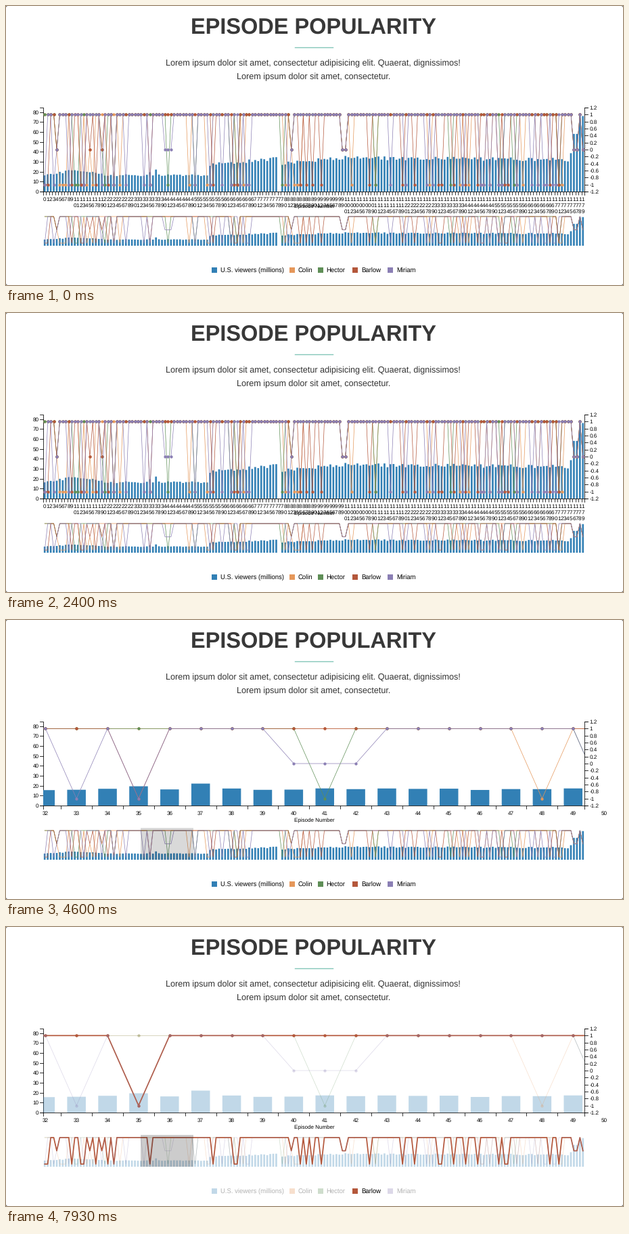
A matplotlib script for the animation above (8 s loop, 912 px wide and 412 px high).

```python
import numpy as np
import matplotlib.pyplot as plt
from matplotlib.animation import FuncAnimation
from matplotlib.collections import LineCollection, PolyCollection
from matplotlib.patches import Polygon, Rectangle

W, H, DPI = 912, 412, 64
PT = 72 / DPI                      # points per pixel
FRAMES, STEP = 160, 50

LEFT, RIGHT, TOP, BASE = 55, 855, 150, 274
SUB_TOP, SUB_BASE = 307, 354
N = 180
Y_MAX, Y2_MAX = 84.5, 1.2
ZOOM_LO, ZOOM_SPAN = 32.428, 17.437
DRAG_START, DRAG_END = 2660, 2840
THIN, THICK, FADED = 0.7, 1.7, 0.3

BLUE = "#3280b5"
NAMES = ["Colin", "Hector", "Barlow", "Miriam"]
COLORS = ["#e5975a", "#5f8f57", "#b4573b", "#8b7fb4"]

# time at which each legend item is pointed at (0 is the bars)
FOCUS = [(5000, 0), (5500, 1), (6150, 2), (7300, 3)]

plt.rcParams["font.family"] = "Liberation Sans"
plt.rcParams["text.hinting"] = "none"


def make_viewers(rng):
    """A rising trend with noise, one missing episode and a final peak."""
    trend = np.interp(np.arange(N), [0, 10, 20, 54, 55, 77, 79, 97, 174],
                      [16, 22, 16.5, 16.5, 27, 33, 28, 34, 32])
    v = trend * rng.uniform(0.94, 1.06, N)
    v[[35, 37, 78]] = 19.4, 22.1, 0
    v[175:] = 38.6, 58, 58, 76, 76
    return v


def make_series(rng, zeros, lows):
    """Mostly 1, with random drops to -1 outside the quiet stretches."""
    i = np.arange(N)
    quiet = ((i > 27) & (i < 53)) | ((i > 69) & (i < 79)) \
        | ((i > 92) & (i < 102)) | (i > 172)
    y = np.where((rng.random(N) < 0.17) & ~quiet, -1.0, 1.0)
    y[lows] = -1
    y[[4, 82, 99, 100, 176, 177, 179] + zeros] = 0
    return y


rng = np.random.default_rng(7)
viewers = make_viewers(rng)
series = [make_series(rng, [15], [48]),
          make_series(rng, [19], [41, 50]),
          make_series(rng, [15, 19], [0, 1, 35]),
          make_series(rng, [40, 41, 42], [33, 35, 50])]

fig = plt.figure(figsize=(W / DPI, H / DPI), dpi=DPI, facecolor="white")
ax = fig.add_axes([0, 0, 1, 1])
ax.set_xlim(0, W)
ax.set_ylim(H, 0)
ax.axis("off")


def write(x, y, s, px, ha="left", color="black", **kw):
    return ax.text(x, y, s, fontsize=px * PT, ha=ha, va="baseline",
                   color=color, **kw)


def stroke(xs, ys, color="black", width=0.8, **kw):
    return ax.plot(xs, ys, color=color, lw=width * PT, **kw)[0]


def clip_area(x0, y0, x1, y1):
    return Rectangle((x0, y0), x1 - x0, y1 - y0, transform=ax.transData)


def place(i, lo, hi):
    """Centre of category i when lo..hi fills the plot width."""
    return LEFT + (np.asarray(i) + 0.5 - lo) * (RIGHT - LEFT) / (hi - lo)


def level(y, top, base):
    return base - (y + Y2_MAX) * (base - top) / (2 * Y2_MAX)


def bar_boxes(x, width, top, base):
    scale = (base - top) / Y_MAX
    return [[(a - width / 2, base), (a - width / 2, base - v * scale),
             (a + width / 2, base - v * scale), (a + width / 2, base)]
            for a, v in zip(x, viewers)]


def add_bars(boxes):
    bars = PolyCollection(boxes, facecolors=BLUE, edgecolors="none", zorder=2)
    bars.set_snap(False)
    ax.add_collection(bars)
    return bars


# heading
write(454.5, 41, "EPISODE POPULARITY", 32.5, "center", "#383838",
      weight="bold")
stroke([427, 483], [60.5, 60.5], "#84c7b9", 1.4)
write(454, 88, "Lorem ipsum dolor sit amet, consectetur adipisicing elit. "
      "Quaerat, dignissimos!", 12.58, "center", "#333333")
write(455, 108, "Lorem ipsum dolor sit amet, consectetur.", 12.58, "center",
      "#333333")
for cx, dx in [(0, 2), (W, -2)]:
    for cy, dy in [(0, 2), (H, -2)]:
        ax.add_patch(Polygon([(cx, cy), (cx + dx, cy), (cx, cy + dy)],
                             fc="#777777", lw=0))

# axes
for x, out in [(LEFT, -5), (RIGHT, 5)]:
    stroke([x + out, x, x, x + out], [TOP, TOP, BASE, BASE])
stroke([LEFT, LEFT, RIGHT, RIGHT], [BASE + 5, BASE, BASE, BASE + 5], zorder=4)
for v in range(0, 81, 10):
    y = BASE - v * (BASE - TOP) / Y_MAX
    stroke([LEFT - 5, LEFT], [y, y])
    write(48.5, y + 2.9, str(v), 8.1, "right")
for k in range(-6, 7):
    y = level(k / 5, TOP, BASE)
    stroke([RIGHT, RIGHT + 5], [y, y])
    write(862.5, y + 2.9, f"{k / 5:g}", 8.1)
write(455.5, 298.7, "Episode Number", 8.06, "center", zorder=5)

# main chart
plot_clip = clip_area(LEFT, TOP, RIGHT, BASE)
main_bars = add_bars([])
main_bars.set_clip_path(plot_clip)
main_lines = []
for y, c in zip(series, COLORS):
    line = stroke(np.zeros(N), level(y, TOP, BASE), c, marker="o",
                  ms=4.3 * PT, mew=0, zorder=3)
    line.set_clip_path(plot_clip)
    main_lines.append(line)
ticks = LineCollection([], colors="black", linewidths=0.8 * PT, zorder=4)
ax.add_collection(ticks)

# category labels: digits stacked in the full view, one line when zoomed
stacked, flat = [], []
label_clip = clip_area(28, BASE, 888, 310)
for i, x in enumerate(place(range(N), 0, N)):
    for row, digit in enumerate(str(i)):
        stacked.append(write(x, 288 + 9 * row, digit, 8.1, "center", zorder=4))
    label = write(x, 288, str(i), 8.1, "center", zorder=4, clip_on=True)
    label.set_clip_path(label_clip)
    flat.append(label)

# overview chart
sub_x = place(range(N), 0, N)
sub_bars = add_bars(bar_boxes(sub_x, 0.6 * (RIGHT - LEFT) / N,
                              SUB_TOP, SUB_BASE))
sub_lines = [stroke(sub_x, level(y, SUB_TOP, SUB_BASE), c, zorder=3)
             for y, c in zip(series, COLORS)]
brush = Rectangle((0, SUB_TOP), 1, SUB_BASE - SUB_TOP, fc="black", lw=0,
                  zorder=4)
ax.add_patch(brush)

# legend
legend = []
for x, name, c in zip([304, 419, 460.5, 512, 564],
                      ["U.S. viewers (millions)"] + NAMES, [BLUE] + COLORS):
    box = Rectangle((x, 385.5), 8, 8, fc=c, lw=0)
    ax.add_patch(box)
    legend.append((box, write(x + 13, 393.3, name, 9.56)))


def show_view(lo, hi, zoomed):
    x = place(range(N), lo, hi)
    gap = (RIGHT - LEFT) / (hi - lo)
    main_bars.set_verts(bar_boxes(x, 0.6 * gap, TOP, BASE))
    for line in main_lines:
        line.set_xdata(x)
    edges = [e for e in x + gap / 2 if LEFT < e < RIGHT]
    ticks.set_segments([[(e, BASE), (e, BASE + 5)] for e in edges])
    for t in stacked:
        t.set_visible(not zoomed)
    for t, a in zip(flat, x):
        t.set_x(a)
        t.set_visible(bool(zoomed and 20 < a < 896))
    ends = LEFT + np.array([lo, hi]) * (RIGHT - LEFT) / N
    brush.set_x(ends[0])
    brush.set_width(ends[1] - ends[0])
    brush.set_visible(zoomed)


def show_focus(active):
    def alpha(k):
        return 1 if active is None or active == k else FADED

    for bars in (main_bars, sub_bars):
        bars.set_alpha(alpha(0))
    for group in (main_lines, sub_lines):
        for k, line in enumerate(group, 1):
            line.set_alpha(alpha(k))
            line.set_linewidth((THICK if active == k else THIN) * PT)
    for k, parts in enumerate(legend):
        for p in parts:
            p.set_alpha(alpha(k))
    brush.set_alpha(0.15 if active is None else 0.2)


def draw(frame):
    t = frame * STEP
    if t >= DRAG_START:
        u = min(1, (t - DRAG_START) / (DRAG_END - DRAG_START))
        u = u * u * (3 - 2 * u)
        show_view(ZOOM_LO, ZOOM_LO + ZOOM_SPAN * (0.3 + 0.7 * u), True)
    else:
        show_view(0, N, False)
    show_focus(next((k for start, k in reversed(FOCUS) if t >= start), None))
    return []


anim = FuncAnimation(fig, draw, frames=FRAMES, interval=STEP,
                     init_func=lambda: draw(0), repeat=True, repeat_delay=0)
plt.show()
```
